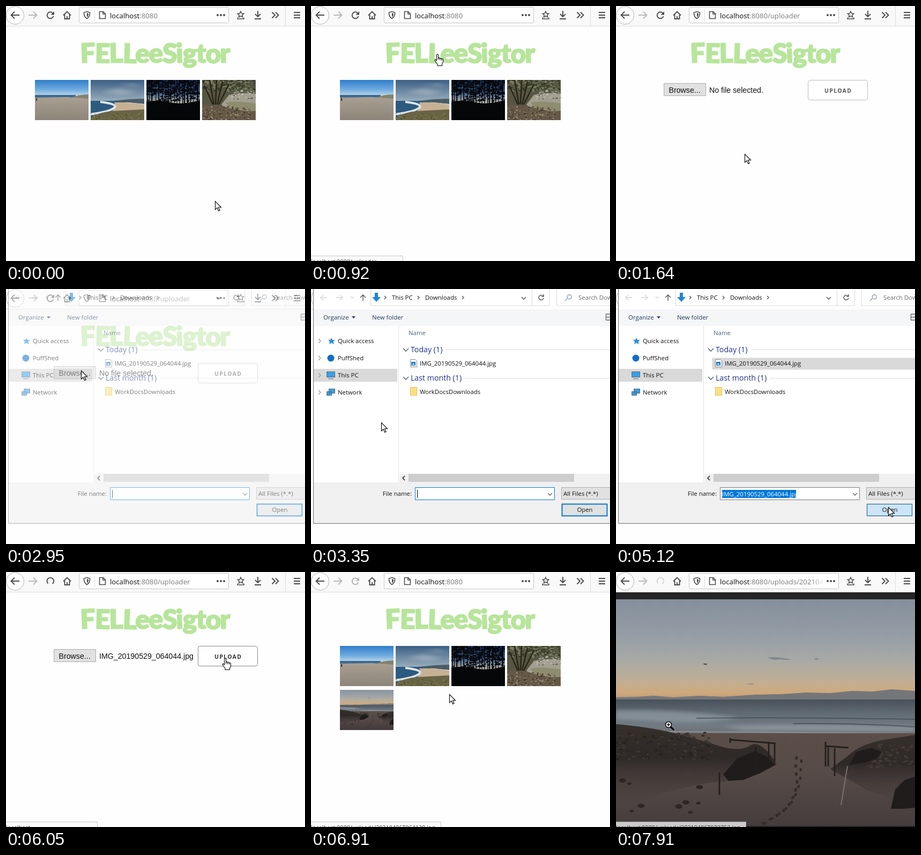
An HTML page that plays this animation: 558x476 px, repeating every 7.99 s.

```html
<!DOCTYPE html>
<html lang="en">
<head>
<meta charset="utf-8">
<title>Photo upload</title>
<style>
html, body { margin: 0; width: 100%; height: 100%; overflow: hidden; background: #fefefe; }
svg { display: block; }
text { white-space: pre; }
.ui { font-family: "Open Sans", "Noto Sans", sans-serif; font-size: 11.4px; fill: #111; }
.url { font-size: 13.2px; fill: #0c0c0d; }
.group { font-size: 14.2px; fill: #1e3287; }
.form { font: 14.2px "Liberation Sans", Arial, sans-serif; fill: #111; }
.title { font: 900 50px Lato, sans-serif; letter-spacing: -1.6px; fill: #b7e59b; stroke: #b7e59b; stroke-width: 1.6; stroke-linejoin: round; }
.caps { font: 700 10.5px "Open Sans", sans-serif; letter-spacing: 1.3px; }
.line { fill: none; stroke: #4a4a4c; stroke-width: 1.9; }
.thin { fill: none; stroke: #666; stroke-width: 1.3; }
</style>
</head>
<body>
<svg width="558" height="476" viewBox="0 0 558 476">
<defs>
  <linearGradient id="sky" x2="0" y2="1">
    <stop stop-color="#858f9b"/><stop offset=".35" stop-color="#949da5"/><stop offset=".6" stop-color="#a8a9a6"/>
    <stop offset=".82" stop-color="#c1ae92"/><stop offset=".93" stop-color="#cfa97c"/><stop offset="1" stop-color="#b99672"/>
  </linearGradient>
  <linearGradient id="sea" x2="0" y2="1">
    <stop stop-color="#48515a"/><stop offset=".4" stop-color="#616b74"/><stop offset=".75" stop-color="#727b83"/><stop offset="1" stop-color="#6b6c6e"/>
  </linearGradient>
  <linearGradient id="sand" x2="0" y2="1">
    <stop stop-color="#5b4e48"/><stop offset=".35" stop-color="#574b48"/><stop offset=".85" stop-color="#443c3c"/><stop offset="1" stop-color="#403838"/>
  </linearGradient>
  <linearGradient id="dune" x2="0" y2="1">
    <stop stop-color="#35302b"/><stop offset=".4" stop-color="#2e2927"/><stop offset="1" stop-color="#463d3c" stop-opacity="0"/>
  </linearGradient>
  <linearGradient id="day" x2="0" y2="1"><stop stop-color="#2f7dcb"/><stop offset=".6" stop-color="#6fabdf"/><stop offset="1" stop-color="#c0d9ea"/></linearGradient>
  <linearGradient id="haze" x2="0" y2="1"><stop stop-color="#3c5f85"/><stop offset="1" stop-color="#9fb2be"/></linearGradient>
  <linearGradient id="beach" x2="0" y2="1"><stop stop-color="#a99f92"/><stop offset="1" stop-color="#8d8579"/></linearGradient>
  <linearGradient id="dusk" x2="0" y2="1"><stop stop-color="#14264a"/><stop offset=".55" stop-color="#42618a"/><stop offset="1" stop-color="#c9c0a6"/></linearGradient>
  <linearGradient id="fade"><stop stop-color="#fff" stop-opacity="0"/><stop offset="1" stop-color="#fff"/></linearGradient>
  <filter id="soft"><feGaussianBlur stdDeviation="3"/></filter>
  <clipPath id="thumb"><path d="M0 0h100v75H0z"/></clipPath>
  <clipPath id="urlClip"><path d="M190 4h197v27H190z"/></clipPath>

  <g id="sunset">
    <path fill="url(#sky)" d="M0 51h558v188H0z"/>
    <g fill="#7f858c"><path d="M282 160l14-1 10 1 22 3-10 1-12-1-10 1zM368 162l8-1 3 2-6 1zM240 209l18-1-3 2z"/></g>
    <path fill="#222" d="M163 171l7 .5-1 1.500-5-.5z"/>
    <path fill="#74767a" d="M0 239V234l40-1 30-2 36 3 50-3 44 2 60-4 50-1 44-3 46 1 40-4 40 1 34-4 44 3v20z"/>
    <path fill="url(#sea)" d="M0 238h558v66H0z"/>
    <path fill="#98a3ab" opacity=".6" filter="url(#soft)" d="M0 258q120-2 230 14-60 12-130 8L0 276zM200 288q180-6 358 2v8l-320-2z"/>
    <path fill="none" stroke="#3f4950" stroke-width="2" opacity=".7" d="M330 283q120-1 228 6M150 273q200-2 408 2"/>
    <path fill="none" stroke="#8c9094" stroke-width="2" d="M100 298l180 1 278 3"/>
    <path fill="url(#sand)" d="M0 301h558v209H0z"/>
    <path fill="url(#dune)" d="M0 284q60 5 105 16t85 24 60 0 50 34q-60 32-110 34T0 440z"/>
    <path fill="url(#dune)" d="M558 304l-62 10q-40 8-62 28l-34 26 70 40 88 30z"/>
    <g id="scrub"></g>
    <path fill="#1f1c1b" d="M200 378l26-30 34-14 24 12 14 14-30 16-30 12-28 2zM436 360l12-24 28-8 20 8-10 12-22 8zM513 442l8-36 18-18 19-6v58l-22 2z"/>
    <path fill="none" stroke="#241f1d" stroke-width="2.800" d="M213 310v9M213 313l85 7M261 326v50M285 317v34M296 319v35M391 317v46M396 327v36M408 329v52M392 325l42 3M193 374v42"/>
    <path fill="none" stroke="#7a716c" stroke-width="2" d="M432 362l-12 73"/>
    <g fill="none" stroke="#342c2b" stroke-linecap="round">
      <path stroke-width="5" stroke-dasharray="2 13" d="M337 346q-3 20 0 35t-6 38-32 36-50 30"/>
      <path stroke-width="4.500" stroke-dasharray="2 14" d="M346 352q-2 22-2 32t-8 30-24 32-42 28"/>
    </g>
  </g>

  <path id="arrow" d="M.5.5V16l3.500-3.300 2.700 5.800 2.400-1.100L6.500 11.800H11.500z" fill="#fff" stroke="#000" stroke-width="1.100"/>
  <g id="hand" fill="#fff" stroke="#000" stroke-width="1.100" stroke-linejoin="round">
    <path d="M-1.500 1.500Q-1.500 0 0 0T1.600 1.500V7q2-1 3 .8 2-.8 3 .8 2.600-.5 2.900 1.900v4.500L8.500 18.500V21.500H0V19L-4.500 12.500q-1-2 .5-2.300 1.300 0 2.500 2z"/>
    <path d="M1.600 7v3.500M4.600 8v3M7.600 9v2.500"/>
  </g>
  <g id="zoom">
    <path d="M4 6l6 6" stroke="#000" stroke-width="3"/>
    <circle cy="2" r="5.500" fill="#fff" stroke="#000" stroke-width="1.500"/>
    <path d="M-3 2h6M0-1v6" stroke="#000" stroke-width="1.500"/>
  </g>
</defs>

<!-- Page -->
<path fill="#fefefe" d="M0 38h558v438H0z"/>
<text class="title" x="278" y="106" text-anchor="middle" rotate="-2 1 -1 2 0 -2 1 -2 1 0 2 -1">FELLeeSigtor</text>

<g data-t="0 1010 6360 7750">
  <g transform="translate(54 138)" clip-path="url(#thumb)">
    <path fill="url(#day)" d="M0 0h100v30H0z"/>
    <path fill="#3d6990" d="M0 28h76v5H0z"/>
    <path fill="#84836b" d="M68 33q14-6 32-6v10H62z"/>
    <path fill="url(#beach)" d="M0 33l60-1 40 3v40H0z"/>
    <path fill="#233" d="M2 34h2v5H2z"/>
  </g>
  <g transform="translate(158 138)" clip-path="url(#thumb)">
    <path fill="url(#haze)" d="M0 0h100v42H0z"/>
    <path fill="#b9c5ce" opacity=".5" filter="url(#soft)" d="M20 22l32-6 36 6-30 6zM50 10l30-3 18 5z"/>
    <path fill="#2d5b80" d="M0 39h66l-6 36H0z"/>
    <path fill="#4a5c66" d="M42 39l30-3 28-1v10z"/>
    <path fill="#c6b195" d="M44 42q30-1 56 4v13l-64 2q14-9 8-19z"/>
    <path fill="none" stroke="#dfe6ea" stroke-width="4" d="M18 41q34 4 26 11T0 64"/>
    <path fill="#696446" d="M0 70q16-10 42-12l58-3v20H0z"/>
    <g id="grass"></g>
  </g>
  <g transform="translate(262 138)" clip-path="url(#thumb)">
    <path fill="url(#dusk)" d="M0 0h100v46H0z"/>
    <g id="woods"></g>
    <path fill="#050608" d="M0 40q25-3 45 2t55-4v37H0z"/>
  </g>
  <g transform="translate(366 138)" clip-path="url(#thumb)">
    <path fill="#565743" d="M0 0h100v75H0z"/>
    <path fill="#a39f90" d="M50 28q26-6 50-2v28l-50 6-14-14z"/>
    <path fill="#8f8d70" d="M44 42q24-4 56 2v14l-46 2z"/>
    <path fill="#655846" d="M0 46l36 2q30 10 64 12v15H0z"/>
    <g id="leaves"></g>
    <path fill="none" stroke="#2a2418" stroke-width="2.500" d="M22 46L14 0M25 46L27 0M28 46L38 4M31 46L50 8M20 46L4 10"/>
  </g>
</g>
<g data-t="6360 7750" transform="translate(54 220)"><g clip-path="url(#thumb)"><use href="#sunset" transform="translate(0 -14.200) scale(.18)"/></g></g>

<g data-t="1010 6360">
  <path id="browse" fill="#e1e1e1" stroke="#adadad" d="M89.500 144.500h78v23h-78z"/>
  <text class="form" x="98.500" y="162">Browse...</text>
  <text class="form" id="file" x="174" y="162"></text>
  <rect id="upload" x="358.500" y="138.500" width="111" height="37" rx="4" fill="#fff"/>
  <text class="caps" id="uploadText" x="389" y="162">UPLOAD</text>
</g>

<g data-t="7750 7990">
  <path fill="#262525" d="M0 38h558v438H0z"/>
  <use href="#sunset"/>
  <path fill="#262525" d="M0 474h558v40H0z"/>
</g>

<g id="status">
  <path id="statusBox" fill="#f9f9fa" stroke="#c8c8c8"/>
  <text class="ui" id="statusText" x="0" y="481" style="font-size:10.800px;fill:#444"></text>
</g>

<!-- Browser toolbar -->
<path fill="#f9f9fa" d="M0 0h558v38H0z"/>
<path stroke="#dcdcdd" d="M0 37.500h558M521.500 0v37"/>
<circle cx="17" cy="17.500" r="16.500" fill="#fff" stroke="#b0b0b2"/>
<path class="line" d="M25 17H10M16 10.500L9.500 17l6.500 6.500"/>
<path class="line" style="stroke:#b9b9bb" d="M42 17h15M51 10.500l6.500 6.500-6.500 6.500"/>
<g id="reload"><path class="line" d="M87 13a6 6 0 1 0 1.500 6"/><path d="M90 10v6.500h-6.500z" fill="#4a4a4c"/></g>
<path id="spinner" class="line" d="M78.500 21.500a6.300 6.300 0 1 1 8 .5"/>
<path class="line" d="M107 17.500l7-7 7 7M109.500 16.500V24h9V16.500M114 24v-5"/>
<rect x="136.500" y="2.500" width="279" height="29" rx="2" fill="#fff" stroke="#c6c6c8"/>
<path class="line" style="stroke-width:1.600" d="M151 10.500l5.500 1.500q.5 8-5.500 11.500-6-3.500-5.500-11.500z"/>
<path d="M151 13l3 1q0 4.500-3 7z" fill="#4a4a4c"/>
<path stroke="#dadadb" d="M165.500 7v21"/>
<path class="line" style="stroke-width:1.600" d="M174.500 10.500h7l4 4v9h-11zM181 10.500v4.500h4.500"/>
<g clip-path="url(#urlClip)"><text class="ui url" x="194" y="23">localhost<tspan id="path" fill="#7b7b7d"></tspan></text></g>
<path fill="url(#fade)" d="M364 5h24v25h-24z"/>
<g fill="#4a4a4c"><circle cx="395" cy="17" r="2"/><circle cx="401" cy="17" r="2"/><circle cx="407" cy="17" r="2"/></g>
<path class="line" style="stroke-width:1.500" d="M438 10l1.700 3.700 4 .5-3 2.700.8 4-3.500-2-3.500 2 .8-4-3-2.700 4-.5zM432 21.500v2.500h12v-2.500"/>
<path class="line" d="M470 9v10M465 15l5 5 5-5M464 24h12M496.500 11.500L502 17l-5.500 5.500M503 11.500l5.500 5.500-5.500 5.500M537 12h12M537 17h12M537 22h12"/>

<!-- File dialog -->
<g id="dialog">
  <path fill="#fff" stroke="#6d6d6d" d="M4.500-1V437.500H560V-1z"/>
  <path fill="#f5f6f7" d="M5 38h553v31H5z"/>
  <path fill="#f0f0f0" d="M5 361h553v76H5zM165 345h393v16H165z"/>
  <path fill="#cdcdcd" d="M182 345h309v15H182z"/>
  <path stroke="#e4e4e4" d="M163.500 69v292"/>
  <path fill="none" stroke="#d9d9d9" d="M111.500-1v32h334V-1M412.500 0v31M458.500-1v32H560"/>
  <path class="thin" style="stroke:#d4d4d4" d="M18 16h12M23 11l-5 5 5 5M59 16H47M54 11l5 5-5 5M74 14l3 3 3-3"/>
  <path class="thin" style="stroke-width:1.600" d="M97 22V11M92 16l5-5 5 5M137 13l3 3-3 3M199 13l3 3-3 3M282 13l3 3-3 3M393 15l4 4 4-4M433 13a4.500 4.500 0 1 0 1 4M434 10v4h-4"/>
  <path fill="#1f86d6" d="M119 7h6v8h5l-8 9-8-9h5z"/>
  <path class="thin" style="stroke:#7f96ad" d="M474 22l5-5a4 4 0 1 1 1 1"/>
  <path d="M76 51h7l-3.500 4z" fill="#223a5e"/>
  <path class="thin" d="M550 47h8M550 52.500h8M550 58h8M550.500 47v11"/>
  <g class="ui">
    <text x="151" y="20">This PC</text><text x="213" y="20">Downloads</text>
    <text x="499" y="20" fill="#6d6d6d">Search Downloads</text>
    <g fill="#1e395b"><text x="23" y="57">Organize</text><text x="114" y="57">New folder</text></g>
    <path fill="#d9d9d9" d="M5 149h156v24H5z"/>
    <text x="50" y="101">Quick access</text><text x="50" y="133">PuffShed</text>
    <text x="50" y="165">This PC</text><text x="50" y="197">Network</text>
    <text x="182" y="86" fill="#4c607a">Name</text>
    <path id="row"/>
    <text x="203" y="143">IMG_20190529_064044.jpg</text><text x="203" y="196">WorkDocsDownloads</text>
    <text class="group" x="186" y="118">Today (1)</text><text class="group" x="186" y="171">Last month (1)</text>
    <text x="188" y="386" text-anchor="end">File name:</text>
    <path id="nameBox" fill="#fff" d="M194.500 370.500h260v23h-260z"/>
    <path class="thin" d="M442 381l4 4 4-4"/>
    <path id="caret" stroke="#000" d="M198.500 375v15"/>
    <g id="chosen"><path fill="#0078d7" d="M198 375h138v15H198z"/><text x="198" y="387" fill="#fff">IMG_20190529_064044.jpg</text></g>
    <path fill="#e1e1e1" stroke="#adadad" d="M467.500 370.500H560v22h-92.500z"/>
    <text x="471" y="386">All Files (*.*)</text>
    <path id="open" d="M468.500 401.500h84v22h-84z"/>
    <text x="511" y="416" text-anchor="middle">Open</text>
  </g>
  <path stroke="#dedede" d="M252 113.500h306M286 166.500h272"/>
  <path class="thin" style="stroke:#44546a" d="M172 111l5 5 5-5M172 164l5 5 5-5"/>
  <path class="thin" style="stroke:#444;stroke-width:1.800" d="M175 349l-4 4 4 4"/>
  <path id="chevrons" class="thin" style="stroke:#999" d="M14 93l4 4-4 4M14 125l4 4-4 4M14 157l4 4-4 4M14 189l4 4-4 4"/>
  <path fill="#2a90df" d="M38 91l2 4 5 0-3.500 3 1.500 5-5-2.500-4 2.500 1-5-3-3 4.500-.5z"/>
  <circle cx="37" cy="129" r="6.500" fill="#0f6fc6"/>
  <path fill="#35a2e8" stroke="#667" d="M29.500 154.500h15v10h-15zM32 167.500h10"/>
  <path fill="#35a2e8" stroke="#567" d="M33.500 186.500h11v8h-11zM29.500 191.500h9v7h-9z"/>
  <path fill="#fff" stroke="#888" d="M185.500 131.500h9l3 3v11h-12z"/><path fill="#2277bb" d="M187 136h8v7h-8z"/><path fill="#cfe6f5" d="M188 141l3-3 3 4z"/>
  <path fill="#fbdf83" stroke="#e2bf5b" d="M185.500 183.500h12v15h-12z"/>
</g>

<use id="cursor"/>
</svg>

<script>
const LOOP = 7990, TICK = 77;
const $ = id => document.getElementById(id);
const set = (id, attrs) => { for (const k in attrs) $(id).setAttribute(k, attrs[k]); };
const show = (el, on) => { el.style.display = on ? '' : 'none'; };
const ramp = (t, a, b) => Math.min(1, Math.max(0, (t - a) / (b - a)));
const within = (t, ...w) => w.some((a, i) => i % 2 === 0 && t >= a && t < w[i + 1]);

let seed = 7;
const rnd = (a, b) => (seed = seed * 16807 % 2147483647, a + (b - a) * seed / 2147483647);

// Fills a group with small random blots
function scatter(id, n, [x0, y0, x1, y1], size, colours) {
  let out = '';
  for (let i = 0; i < n; i++) {
    const r = rnd(size / 2, size);
    out += `<ellipse cx="${rnd(x0, x1)}" cy="${rnd(y0, y1)}" rx="${r}" ry="${r * .6}" fill="${colours[i % colours.length]}"/>`;
  }
  $(id).innerHTML += out;
}
scatter('grass', 90, [0, 63, 100, 75], 2, ['#4d5030', '#7d7550', '#837043']);
scatter('leaves', 160, [0, 0, 100, 22], 3, ['#353d25', '#6f7358', '#7f8268', '#3a3d2b']);
scatter('leaves', 180, [0, 50, 90, 75], 2, ['#40372a', '#9b8c75', '#6c5f4b']);
scatter('leaves', 50, [55, 18, 100, 36], 2, ['#c9c6bc', '#5c5a4b', '#a5a296']);
scatter('woods', 300, [0, 0, 100, 26], 3, ['#07090f', '#0b0f18']);
scatter('woods', 60, [0, 26, 100, 40], 3, ['#07090f']);
for (let x = 2; x < 100; x += rnd(3, 8)) $('woods').innerHTML += `<path stroke="#06080c" stroke-width="${rnd(1, 2.5)}" d="M${x} 0v48"/>`;
scatter('scrub', 150, [0, 300, 180, 350], 4, ['#332d2a', '#3c3531', '#282321']);
scatter('scrub', 80, [470, 322, 558, 365], 4, ['#3a332f', '#433a36']);
scatter('scrub', 9, [10, 385, 170, 450], 7, ['#2c2624']);

// Time, x, y of the pointer
const track = [
  [0, 390, 364], [70, 390, 364], [540, 236, 90], [1000, 236, 90], [1470, 240, 276], [1950, 240, 276],
  [2100, 160, 176], [2350, 160, 176], [2640, 140, 152], [2950, 140, 152], [3300, 131, 249], [3400, 131, 249],
  [3900, 236, 139], [4130, 236, 139], [4430, 500, 424], [4510, 500, 424], [4850, 508, 407], [5330, 508, 407],
  [5790, 409, 161], [6840, 409, 161], [6850, 258, 228], [6950, 258, 228], [7290, 98, 283], [LOOP, 98, 283]
];
function pointer(t) {
  const i = Math.max(1, track.findIndex(p => p[0] > t));
  const [a, x, y] = track[i - 1], [b, u, v] = track[i];
  const p = (t - a) / (b - a), e = p * p * (3 - 2 * p);
  return [Math.round(x + (u - x) * e), Math.round(y + (v - y) * e)];
}

function status(t) {
  if (within(t, 700, 1050)) return ['localhost:8080/uploader', 171];
  if (within(t, 5890, 6500)) return ['localhost', 170];
  if (within(t, 6500, 7200)) return ['localhost:8080/uploads/20210406T064130.jpg', 242];
  if (t >= 7200) return ['localhost:8080/uploads/20210406T073753.jpg', 242];
  return ['', 0];
}

function draw(t) {
  document.querySelectorAll('[data-t]').forEach(el => show(el, within(t, ...el.dataset.t.split(' ').map(Number))));

  $('path').textContent = ':8080' + (t >= 7750 ? '/uploads/20210406T073753.jpg' : within(t, 1010, 6360) ? '/uploader' : '');
  const busy = within(t, 930, 1240, 5890, 6360, 7670, LOOP);
  show($('reload'), !busy);
  show($('spinner'), busy);
  $('reload').style.opacity = within(t, 1240, 1640, 6360, 7050) ? .4 : 1;
  $('spinner').style.opacity = t > 7670 ? .2 : 1;

  $('file').textContent = t < 5300 ? 'No file selected.' : 'IMG_20190529_064044.jpg';
  const hover = t > 5700;
  set('upload', { stroke: hover ? '#888' : '#bbb' });
  set('uploadText', { fill: hover ? '#333' : '#555' });
  set('browse', { fill: within(t, 2500, 2950) ? '#d2d2d2' : '#e1e1e1' });

  const [label, width] = status(t);
  show($('status'), width);
  $('status').style.opacity = t >= 7750 ? .75 : 1;
  $('statusText').textContent = label;
  set('statusBox', { d: `M-1 466.500H${width + .5}V480H-1z` });

  show($('dialog'), within(t, 2880, 5300));
  $('dialog').style.opacity = ramp(t, 2850, 3040);
  $('chevrons').style.opacity = ramp(t, 3040, 3300) * (1 - ramp(t, 4510, 4890));
  const picked = t >= 4050, pressed = t >= 5040;
  show($('row'), t > 3820);
  set('row', { d: 'M179.500 128.500H560v22H179.500z', fill: pressed ? '#d9d9d9' : picked ? '#cce8ff' : '#e5f3ff', stroke: picked && !pressed ? '#99d1ff' : 'none' });
  show($('chosen'), picked);
  show($('caret'), !picked);
  set('nameBox', { stroke: picked ? '#7a7a7a' : '#0078d7' });
  set('open', {
    fill: pressed ? '#cce4f7' : t > 4400 ? '#e5f1fb' : '#e1e1e1',
    stroke: pressed ? '#005499' : '#0078d7', 'stroke-width': pressed ? 1 : 2
  });

  const [x, y] = pointer(Math.floor(t / TICK) * TICK);
  const shape = t >= 7750 ? 'zoom' : within(t, 460, 1050, 5700, 6850, 7200, 7750) ? 'hand' : 'arrow';
  set('cursor', { href: '#' + shape, transform: `translate(${x} ${y})` });
}

const start = performance.now();
function tick() {
  draw((performance.now() - start) % LOOP);
  requestAnimationFrame(tick);
}
tick();
</script>
</body>
</html>
```
